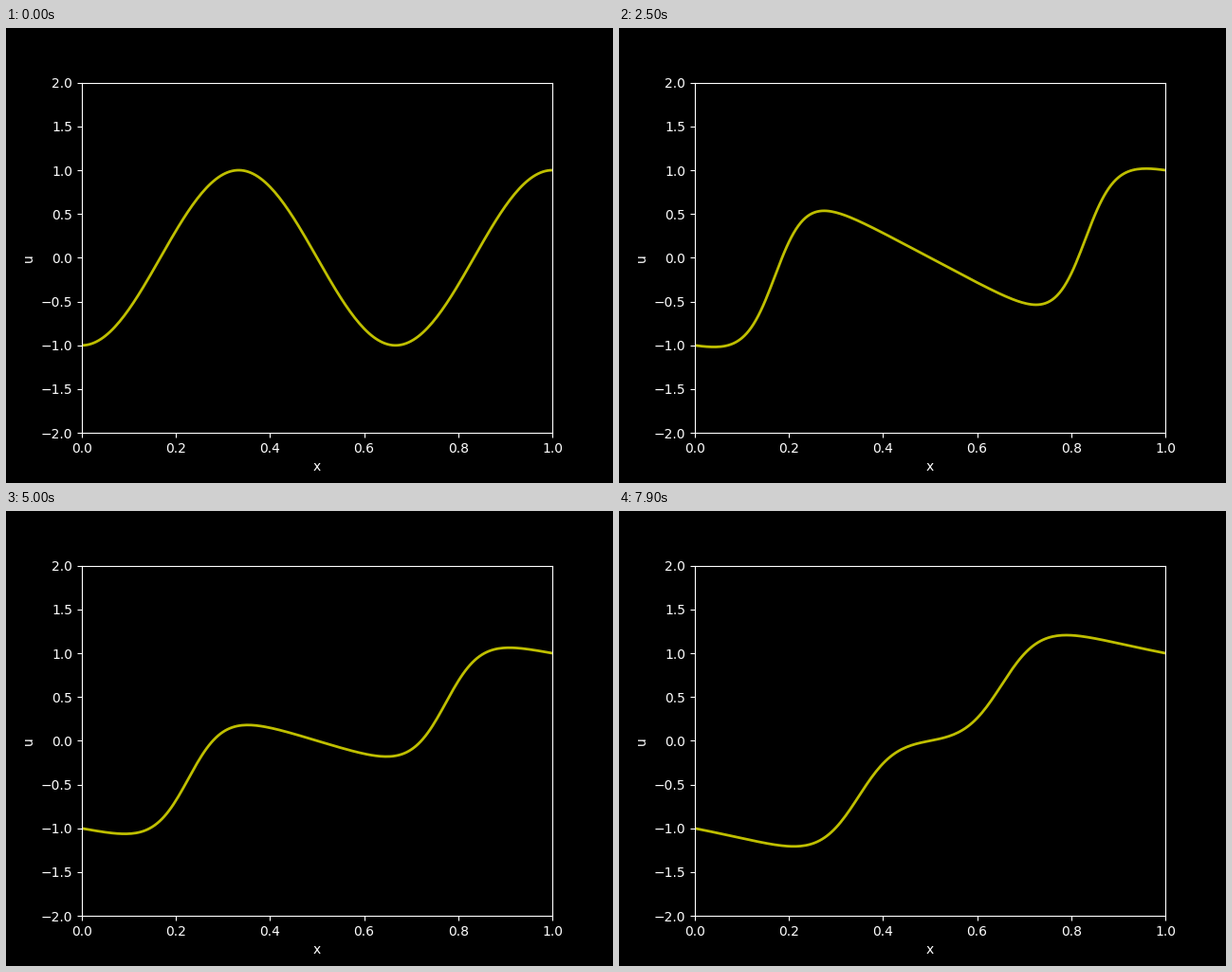
A matplotlib script for the animation above (8 s loop, 640x480 px).

```python
import numpy as np
import matplotlib.pyplot as plt
from matplotlib.animation import FuncAnimation

EPS = 0.03       # viscosity
DT = 0.009       # model time per frame
SUBSTEPS = 20
FRAMES = 80
INTERVAL = 100

x = np.linspace(0, 1, 201)
dx = x[1] - x[0]


def rhs(u):
    """u_t = EPS u_xx + u u_x + u^3 with both ends held fixed."""
    du = np.zeros_like(u)
    left, mid, right = u[:-2], u[1:-1], u[2:]
    du[1:-1] = (EPS * (right - 2 * mid + left) / dx**2
                + (right**2 - left**2) / (4 * dx)
                + mid**3)
    return du


def rk4(u, h):
    k1 = rhs(u)
    k2 = rhs(u + h / 2 * k1)
    k3 = rhs(u + h / 2 * k2)
    k4 = rhs(u + h * k3)
    return u + h / 6 * (k1 + 2 * k2 + 2 * k3 + k4)


def solve():
    u = -np.cos(3 * np.pi * x)
    states = [u]
    for _ in range(FRAMES - 1):
        for _ in range(SUBSTEPS):
            u = rk4(u, DT / SUBSTEPS)
        states.append(u)
    return states


states = solve()

plt.style.use("dark_background")
fig, ax = plt.subplots(figsize=(6.4, 4.8), dpi=100)
ax.set(xlim=(0, 1), ylim=(-2, 2), xlabel="x", ylabel="u")
line, = ax.plot(x, states[0], color="y", lw=2)


def update(i):
    line.set_ydata(states[i])
    return line,


anim = FuncAnimation(fig, update, frames=FRAMES, interval=INTERVAL,
                     repeat=True, repeat_delay=0)
plt.show()
```
